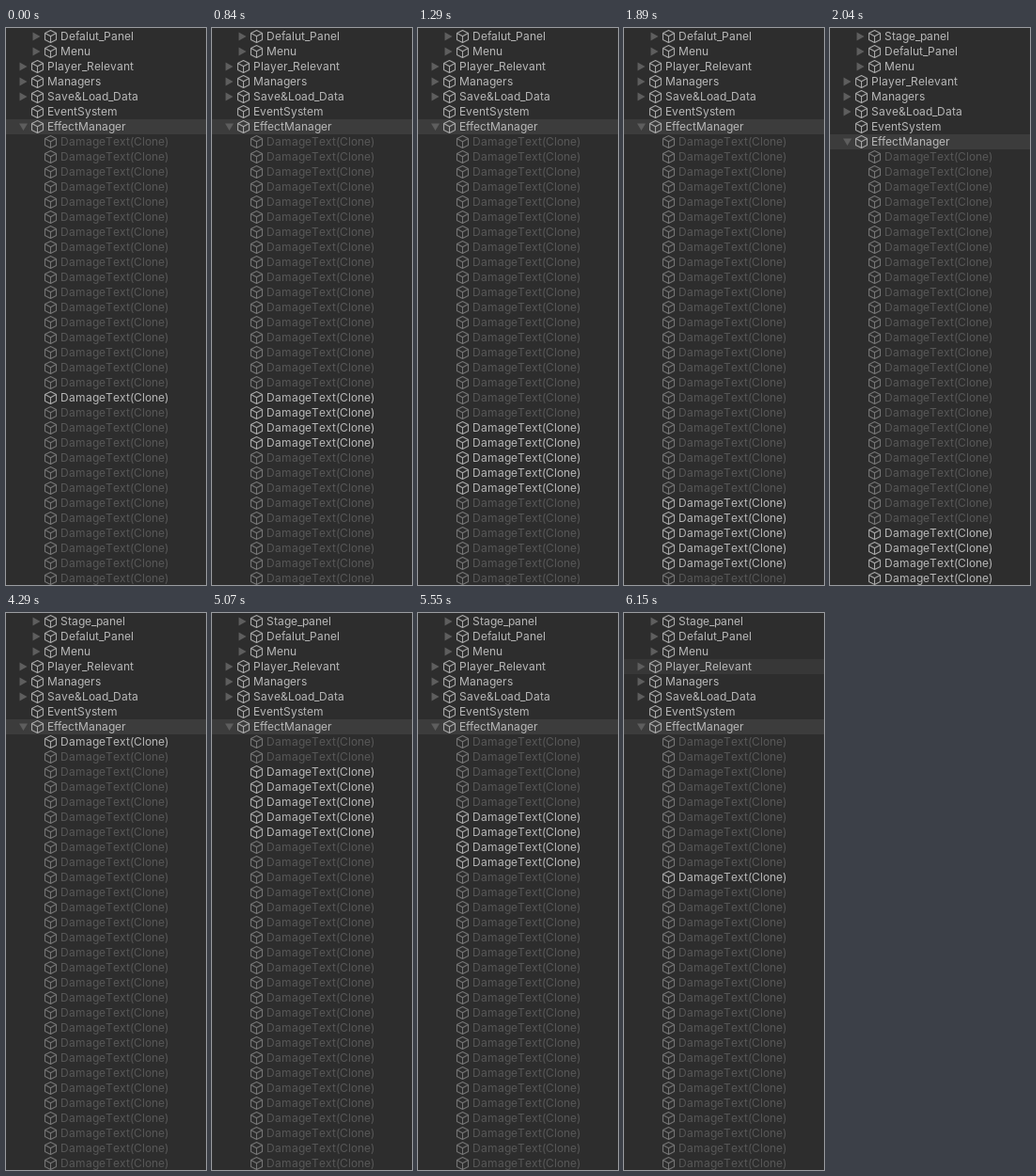
An HTML page for the animation above (6.18 s loop, 213 by 592 pixels).

```html
<!DOCTYPE html>
<html lang="en">
<head>
<meta charset="utf-8">
<title>Object pool hierarchy</title>
<style>
  html, body { margin: 0; width: 100%; height: 100%; overflow: hidden; background: #2d2d2d; }
  svg { display: block; }
  text { font: 12px Inter, Roboto, sans-serif; font-kerning: none; fill: #b8b8b8; }
  .cube { fill: none; stroke: #a8a8a8; stroke-width: 1.1; stroke-linejoin: round; }
  .arrow { fill: #5e5e5e; }
  .bar { fill: #3c3c3c; }
  .hover { fill: #373737; visibility: hidden; }
  .off text { fill: #585858; }
  .off .cube { stroke: #757575; }
</style>
</head>
<body>
<svg id="stage" width="213" height="592" viewBox="0 0 213 592"><g id="list"></g></svg>
<script>
const LOOP = 6180, ROW = 16, CLONES = 30;
const SCROLL_AT = 2040, HOVER_AT = 6000;

// label, indent level, arrow
const HEADERS = [
  ['Stage_panel', 1, 'right'],
  ['Defalut_Panel', 1, 'right'],
  ['Menu', 1, 'right'],
  ['Player_Relevant', 0, 'right'],
  ['Managers', 0, 'right'],
  ['Save&Load_Data', 0, 'right'],
  ['EventSystem', 0, ''],
  ['EffectManager', 0, 'down']
];

// Each burst switches on pool slots in turn, one per gap; each stays on for LIFE.
// Gap, lead and LIFE count refresh steps; step is the refresh time in ms.
const LIFE = 4.45;
const BURSTS = [
  { slot: 17, count: 12, start: 690, step: 150, gap: 0.85, lead: 1.83 },
  { slot: 0, count: 9, start: 4280, step: 154, gap: 0.91, lead: 0.5 },
  { slot: 9, count: 1, start: HOVER_AT, step: 150, gap: 1, lead: 0 }
];

const ARROWS = { right: 'M-4 -4.5L4 0L-4 4.5Z', down: 'M-4.5 -3.5H4.5L0 4Z' };
const CUBE = 'M0 -6.4L6 -3.4V3.4L0 6.4L-6 3.4V-3.4ZM-6 -3.4L0 -.3L6 -3.4M0 -.3V6.4';

const list = document.getElementById('list');
const pen = document.createElement('canvas').getContext('2d');
pen.font = '12px Inter, Roboto, sans-serif';

function add(parent, tag, attrs) {
  const el = document.createElementNS('http://www.w3.org/2000/svg', tag);
  for (const key in attrs) el.setAttribute(key, attrs[key]);
  return parent.appendChild(el);
}

// Glyphs advance by whole pixels, as in the editor's own text.
function glyphStarts(label, x) {
  return [...label].map(char => {
    const at = x;
    x += Math.round(pen.measureText(char).width);
    return at;
  }).join(' ');
}

function addRow(index, label, level, arrow) {
  const row = add(list, 'g', { transform: `translate(0 ${index * ROW - 7})` });
  const x = 33.5 + level * 14;
  if (arrow) add(row, 'path', { class: 'arrow', d: ARROWS[arrow], transform: `translate(${x - 15} 0)` });
  add(row, 'path', { class: 'cube', d: CUBE, transform: `translate(${x} 0)` });
  add(row, 'text', { x: glyphStarts(label, x + 10.5), y: 4 }).textContent = label;
  return row;
}

function addBar(index, name) {
  return add(list, 'rect', { class: name, y: index * ROW - 15, width: 213, height: ROW });
}

addBar(7, 'bar');
const hover = addBar(3, 'hover');
HEADERS.forEach((header, i) => addRow(i, ...header));
const clones = Array.from({ length: CLONES }, (_, i) =>
  addRow(HEADERS.length + i, 'DamageText(Clone)', 1, ''));

function isActive(slot, t) {
  return BURSTS.some(({ slot: first, count, start, step, gap, lead }) => {
    const i = slot - first;
    if (i < 0 || i >= count) return false;
    const age = Math.max(-1, Math.floor((t - start) / step)) - (i * gap - lead);
    return age >= 0 && age < LIFE;
  });
}

function draw(t) {
  clones.forEach((row, i) => row.setAttribute('class', isActive(i, t) ? '' : 'off'));
  list.setAttribute('transform', `translate(0 ${t >= SCROLL_AT ? ROW : 0})`);
  hover.style.visibility = t >= HOVER_AT ? 'visible' : 'hidden';
}

const start = performance.now();
function tick() {
  draw((performance.now() - start) % LOOP);
  requestAnimationFrame(tick);
}
tick();
</script>
</body>
</html>
```
